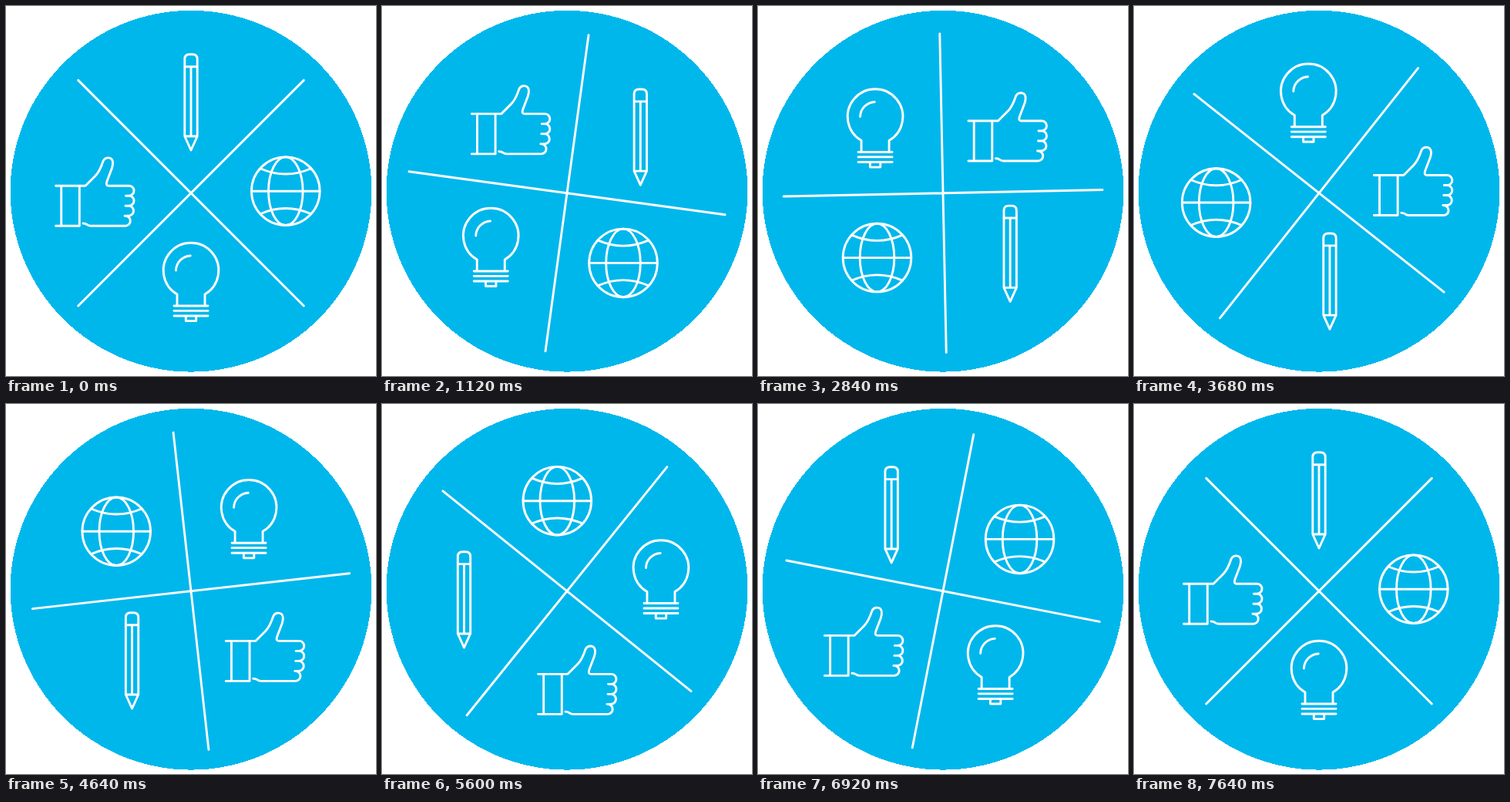
These frames come from a looping animation (480 px wide and 480 px high, 7680 ms). An HTML page:

```html
<!DOCTYPE html>
<html lang="en">
<head>
<meta charset="utf-8">
<title>Four icons</title>
<style>
  html, body { margin: 0; height: 100%; overflow: hidden; background: #fff; }
  svg { display: block; width: 100%; height: 100%; }
  .ink { fill: none; stroke: #fff; stroke-width: 2.9; stroke-linecap: round; stroke-linejoin: round; }
</style>
</head>
<body>
<svg viewBox="0 0 480 480">
  <circle cx="240" cy="240.2" r="234.4" fill="#00b7ec" shape-rendering="crispEdges"/>
  <g class="ink">
    <path id="cross" d="M-146.3-146.3 146.3 146.3M146.3-146.3-146.3 146.3"/>
    <path id="pencil" d="M-8.2 44V-56Q-8.2-62.2-2-62.2H2Q8.2-62.2 8.2-56V44L0 62ZM-8.2-46.3H8.2M-8.2 44H8.2M0-46.3V44"/>
    <g id="globe">
      <circle r="44.3"/>
      <ellipse rx="22.3" ry="44.3"/>
      <path d="M-44.3 0H44.3M-33-29.5Q0-15 33-29.5M-33 29.5Q0 15 33 29.5"/>
    </g>
    <path id="bulb" d="M-18 31V16A35.8 35.8 0 1 1 18 16V31M-19.5-15A19.5 19.5 0 0 1-.8-34M-22 31H22M-22 37.4H22M-22 44H22M-6.700 44V50.600H6.700V44"/>
    <path id="thumb" d="M-50.500-7H-12L1-20C6-25 9-33 11-39C13-44 19-44 21.500-42C24.500-39.500 24-35 22.500-30L16-13Q14-7 18-7H44.500A6.400 6.400 0 0 1 44.500 6H40.500M44.500 6A6.500 6.500 0 0 1 44.500 19H40M44 19A6.500 6.500 0 0 1 44 32H39M40 32A6.500 6.500 0 0 1 39.500 45H-5Q-8 45-10 43.300Q-12 41.800-15 41.800M-50.500 45H-19.700M-43.300-7V45M-19.700-7V45"/>
  </g>
</svg>
<script>
const LOOP = 7680, STEP = 40, RAD = Math.PI / 180;
const RADIUS = 116.5, RIGHT = 6.3;

// phase: starting angle; left: extra reach on the left; power: how tightly the reach hugs the sides
const icons = {
  pencil: { phase: 0, left: 18, power: 4 },
  globe: { phase: 90, left: 18, power: 4 },
  bulb: { phase: 180, left: 8.5, power: 2 },
  thumb: { phase: 270, left: 8.5, power: 2 }
};

const place = (id, transform) => document.getElementById(id).setAttribute('transform', transform);

function draw(now) {
  const turn = Math.floor(now % LOOP / STEP) / (LOOP / STEP - 1) * 360;
  place('cross', `translate(240 242.7) rotate(${turn})`);
  for (const [id, { phase, left, power }] of Object.entries(icons)) {
    const a = (phase + turn) * RAD, s = Math.sin(a);
    const r = RADIUS + (s > 0 ? RIGHT : left) * s ** power;
    const angle = a + (.9 * Math.sin(2 * a) - .6 * s) * RAD;
    place(id, `translate(${240 + r * Math.sin(angle)} ${241.5 - r * Math.cos(angle)})`);
  }
}

function tick() {
  draw(performance.now());
  requestAnimationFrame(tick);
}
tick();
</script>
</body>
</html>
```
